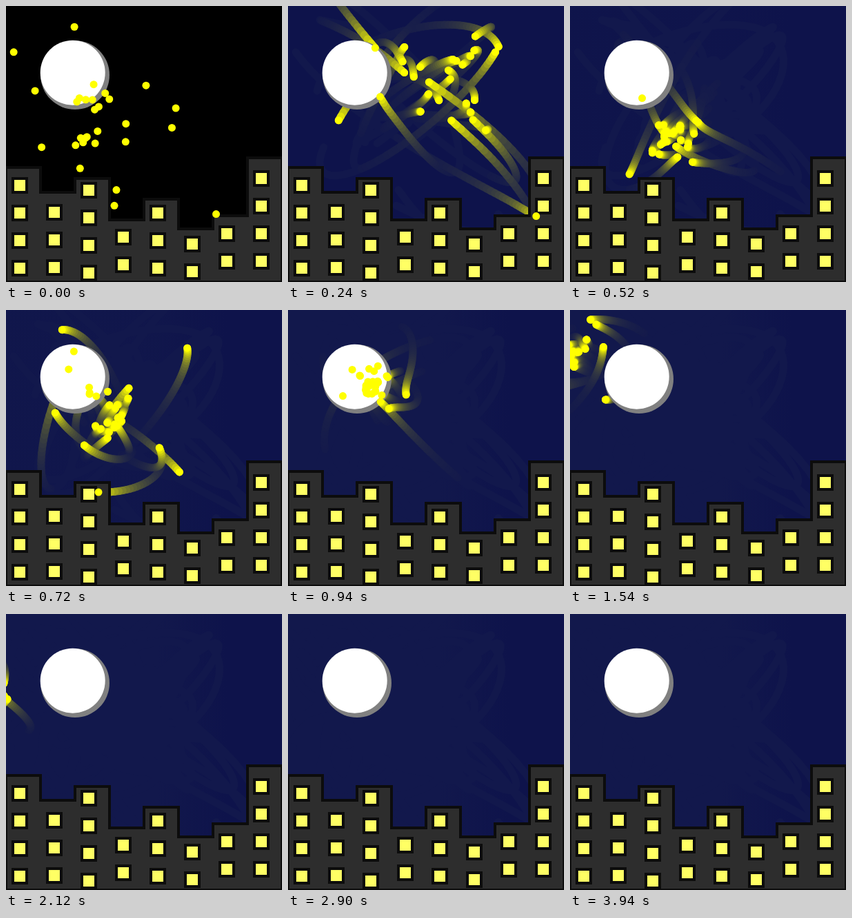
These frames come from a looping animation (400 by 400 pixels, 4.8 s). An HTML page with a canvas:

```html
<!DOCTYPE html>
<html lang="en">
<head>
<meta charset="utf-8">
<title>Fireflies over the city</title>
<style>
html, body { margin: 0; width: 100%; height: 100%; overflow: hidden; background: #000; }
canvas { display: block; }
</style>
</head>
<body>
<canvas id="stage" width="400" height="400"></canvas>
<script>
const ctx = document.getElementById('stage').getContext('2d');
const LOOP = 4800, STEP = 20, FADE_MS = 30, SIZE = 11;
const BLACK = [0, 0, 0], NIGHT = [14, 19, 75], HAZE = [18, 24, 76], GLOW = [255, 255, 0];

// The swarm as a whole: time, centre x, centre y, spread.
const swarm = [
  [0, 140, 160, 95], [220, 225, 115, 95], [520, 148, 185, 30], [730, 150, 150, 60],
  [940, 122, 112, 22], [1240, 60, 90, 55], [1540, -5, 72, 28], [1830, -10, 105, 40],
  [2120, -35, 100, 30], [2400, -20, 100, 45], [2640, -120, 60, 20], [3250, -120, 150, 20],
  [3420, -60, 200, 25], [3600, -120, 250, 20], [3740, -120, 250, 20], [3810, -60, 250, 25],
  [3880, -120, 250, 20]
];

let seed = 7;
function random(min = 0, max = 1) {
  seed = seed * 16807 % 2147483647;
  return min + (max - min) * seed / 2147483647;
}
const tempo = () => random(0.006, 0.014) * (random() < 0.5 ? -1 : 1);

const flies = Array.from({ length: 30 }, () => ({
  reach: 0.4 + 2.2 * random() ** 3,
  x0: random(0, 6.28), y0: random(0, 6.28),
  wx: tempo(), wy: tempo()
}));

function swarmAt(t) {
  const next = swarm.findIndex(key => key[0] > t);
  if (next < 0) return swarm[swarm.length - 1];
  const a = swarm[next - 1], b = swarm[next];
  const u = (t - a[0]) / (b[0] - a[0]), ease = u * u * (3 - 2 * u);
  return a.map((v, i) => v + (b[i] - v) * ease);
}

// All flies at one time, each on its own looping orbit about the centre.
function place(t) {
  const [, x, y, spread] = swarmAt(t);
  return flies.map(f => [
    x + spread * f.reach * Math.cos(f.x0 + f.wx * t),
    y + spread * f.reach * Math.sin(f.y0 + f.wy * t)
  ]);
}

const mix = (a, b, k) => `rgb(${a.map((v, i) => Math.round(v + (b[i] - v) * k)).join()})`;
const fade = age => Math.exp(-age / FADE_MS);

function disc(x, y, r, color) {
  ctx.fillStyle = color;
  ctx.beginPath();
  ctx.arc(x, y, r, 0, 2 * Math.PI);
  ctx.fill();
}

function strokeFlights(times, color) {
  const stops = times.map(place);
  ctx.strokeStyle = color;
  ctx.beginPath();
  flies.forEach((_, i) => stops.forEach((stop, j) => ctx[j ? 'lineTo' : 'moveTo'](...stop[i])));
  ctx.stroke();
}

function drawTrails(t) {
  ctx.lineWidth = SIZE;
  ctx.lineCap = ctx.lineJoin = 'round';
  // Faint marks that never fade completely.
  const past = Math.min(t, 1200);
  strokeFlights(Array.from({ length: past / 10 + 1 }, (_, i) => i * 10), `rgb(${HAZE})`);
  for (let age = Math.min(t, 140); age > 0; age -= 4) {
    strokeFlights([t - age, Math.min(t, t - age + 4)], mix(HAZE, GLOW, fade(age)));
  }
}

const haze = ctx.createLinearGradient(220, 0, 320, 0);
haze.addColorStop(0, `rgba(${HAZE},1)`);
haze.addColorStop(1, `rgba(${HAZE},0)`);

function drawSky(t) {
  ctx.fillStyle = mix(BLACK, NIGHT, 1 - fade(t));
  ctx.fillRect(0, 0, 400, 400);
  ctx.globalAlpha = Math.min(1, Math.max(0, (t - 400) / 500));
  ctx.fillStyle = haze;
  ctx.fillRect(0, 0, 400, 400);
  ctx.globalAlpha = 1;
}

const roofs = [234, 270, 250, 310, 280, 323, 304, 220];
const topWindows = [260, 299, 267, 335, 300, 345, 330, 250];

function drawCity() {
  ctx.lineWidth = 4;
  ctx.lineJoin = 'miter';
  ctx.strokeStyle = '#0c0c0c';
  ctx.fillStyle = '#2d2d2d';
  ctx.beginPath();
  ctx.moveTo(0, 400);
  roofs.forEach((y, i) => {
    ctx.lineTo(i * 50, y);
    ctx.lineTo(i * 50 + 50, y);
  });
  ctx.lineTo(400, 400);
  ctx.closePath();
  ctx.fill();
  ctx.stroke();
  ctx.fillStyle = '#ffff64';
  topWindows.forEach((top, i) => {
    for (let y = top; y < 400; y += 40) {
      ctx.fillRect(i * 50 + 10, y - 10, 20, 20);
      ctx.strokeRect(i * 50 + 10, y - 10, 20, 20);
    }
  });
}

function draw(t) {
  drawSky(t);
  if (t) drawTrails(t);
  disc(100, 100, 50, '#808080');
  disc(96.7, 96.7, 47, '#fff');
  drawCity();
  for (const [x, y] of place(t)) disc(x, y, SIZE / 2, `rgb(${GLOW})`);
}

const start = performance.now();
function frame() {
  const t = (performance.now() - start) % LOOP;
  draw(Math.floor(t / STEP) * STEP);
  requestAnimationFrame(frame);
}
frame();
</script>
</body>
</html>
```
